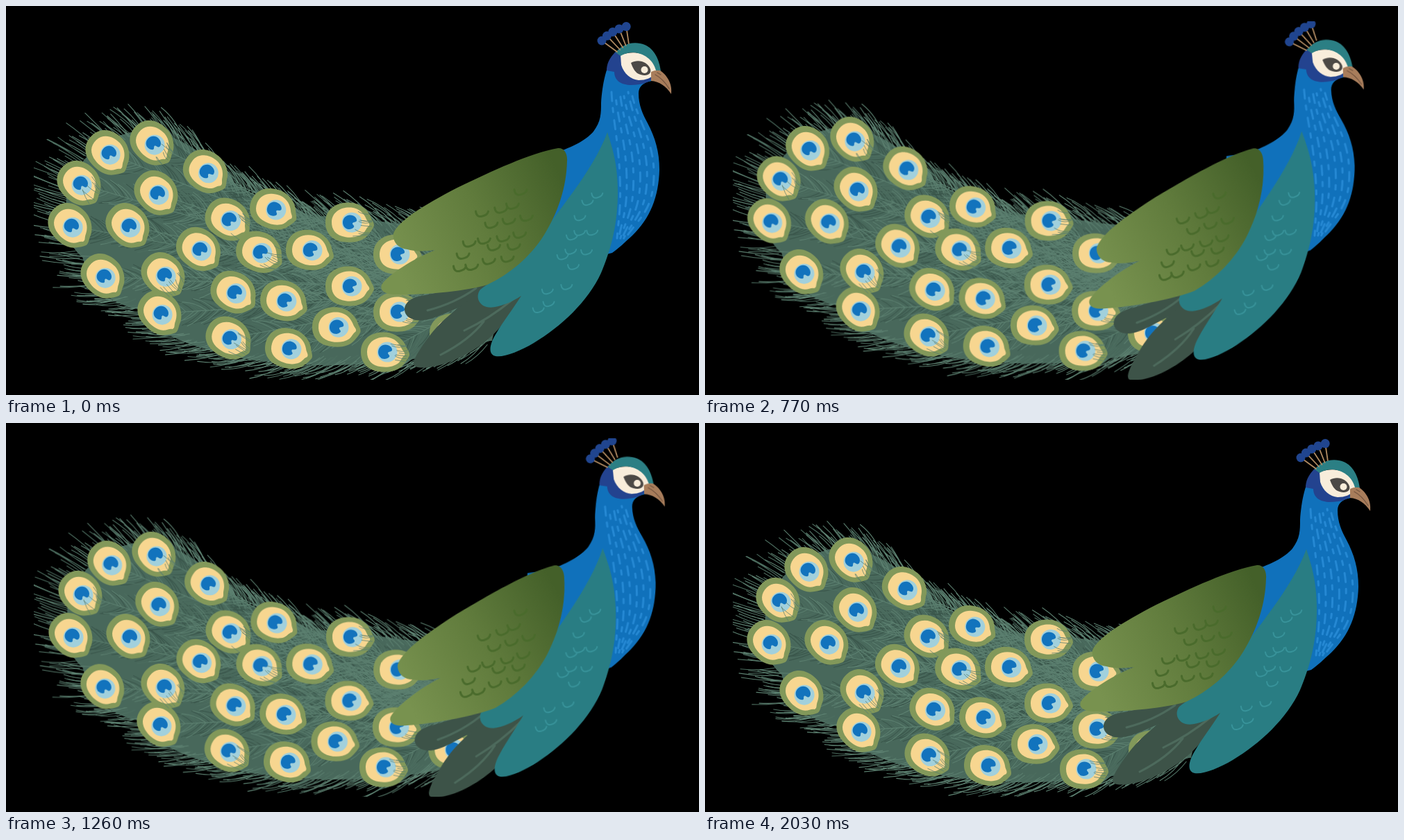
These frames come from a looping animation (998x561 px, 2.1 s). An HTML page:

```html
<!DOCTYPE html>
<html lang="en">
<head>
<meta charset="utf-8">
<title>Peacock</title>
<style>
html, body { margin: 0; width: 100%; height: 100%; overflow: hidden; background: #000; }
svg { display: block; width: 998px; height: 561px; }
.line { fill: none; stroke-linecap: round; stroke-linejoin: round; }
#tail { transform-origin: 710px 370px; }
#body { transform-origin: 769px 390px; }
#crest { transform-origin: 889px 88px; }
#plumes { transform-origin: 805px 290px; }
#teal { transform-origin: 830px 345px; }
#green { transform-origin: 797px 270px; }
</style>
</head>
<body>
<svg viewBox="0 0 998 561" xmlns="http://www.w3.org/2000/svg">
  <defs>
    <clipPath id="stage"><rect x="40" y="22" width="923" height="517"/></clipPath>
    <linearGradient id="moss" gradientUnits="userSpaceOnUse" x1="560" y1="370" x2="805" y2="260">
      <stop offset="0" stop-color="#78924f"/>
      <stop offset=".5" stop-color="#617c3d"/>
      <stop offset="1" stop-color="#446029"/>
    </linearGradient>
    <path id="rim" d="M640,318C560,320 500,298 440,304C385,270 340,282 305,232C270,200 215,168 170,185C125,195 100,235 90,260C82,300 82,340 110,362C122,405 150,430 190,437C220,483 300,498 340,508C430,522 560,528 700,482"/>
    <g id="eye">
      <path fill="#82985a" d="M-35,0C-35,-18 -20,-29 0,-28.500C14,-28 25,-19 29,-11C31,-5 36,-1 35,4C33,9 31,12 28,16C20,28 4,29.500 -8,28.500C-25,27 -35,16 -35,0Z"/>
      <path fill="#f7d690" d="M-26,0C-26,-14 -13,-22 1,-21.500C13,-21 20,-13 23,-7C25,-2 30,0 28,4C24,7 24,11 20,15C13,21 3,22.500 -5,21.500C-19,20 -26,12 -26,0Z"/>
      <circle cx="3" cy="0" r="14.500" fill="#a1d0dc"/>
      <path fill="#1273bd" d="M-10,0C-10,-6 -5,-10.500 0,-10.500C6,-10.500 10,-7 10,-3C9,0 5,-1 4,1C4,4 8,4 6,7C4,9 2,10 -1,10C-6,10 -10,6 -10,0Z"/>
    </g>
  </defs>
  <g clip-path="url(#stage)">
    <g id="tail"></g>
    <g id="body">
      <path fill="#1071bb" d="M757,216L785,213C812,206 835,194 846,181C857,166 857,155 857,140C859,112 864,85 878,66L935,88L930,108C918,110 911,116 911,126C911,143 917,156 924,169C935,190 941,210 941,236C940,275 928,306 902,331C892,340 882,350 873,356L800,375L750,300Z"/>
      <g id="dashes" class="line" stroke="#2588d3" stroke-width="3"></g>
      <path fill="#23438f" d="M879,65C868,75 865,85 865,93L876,95C876,108 887,114 900,114C915,114 927,110 931,104L900,92L887,69Z"/>
      <path fill="#f8eddb" d="M885,71C897,65 916,66 926,74C934,81 937,89 936,95C931,104 921,107 911,107C900,106 890,98 886,85Z"/>
      <path fill="#2b7f84" d="M878,67C888,54 905,50 920,56C934,62 941,78 943,94L936,93C932,77 918,68 904,67C896,67 890,69 885,72Z"/>
      <path fill="#4c4946" d="M900,82C910,76 924,80 928,91C930,98 923,102 914,99C906,97 903,90 900,82Z"/>
      <circle cx="919.500" cy="92" r="5" fill="#f8eddb"/>
      <path fill="#a87d5b" d="M929,95Q935,92 942,93C951,99 960,111 958,127C950,115 941,109 929,108Z"/>
      <path class="line" stroke="#765640" stroke-width="1.300" d="M935,99Q946,105 955,119M938,96l5,3"/>
      <g id="crest"></g>
    </g>
    <g id="plumes">
      <path fill="#3d5348" d="M574,438C574,426 587,419 604,417C640,409 690,398 720,395L690,426C665,428 650,436 635,442C617,450 603,455 590,453C580,451 574,445 574,438Z"/>
      <path fill="#3d5348" d="M660,429C642,443 625,455 609,477C595,496 584,513 588,519C596,525 626,520 647,510C677,497 699,479 716,458Q730,437 755,410L700,400Z"/>
      <path class="line" stroke="#4d6a5c" stroke-width="3" d="M607,439Q646,429 677,407M626,503Q667,482 688,455M660,468Q696,451 730,423"/>
    </g>
    <g id="teal">
      <path fill="#297d83" d="M866,182C874,207 882,232 881,275C880,320 870,354 857,385C838,426 800,462 760,486C738,499 712,509 702,504C693,499 699,483 706,472C716,455 730,437 742,418C725,429 705,437 692,434C680,431 676,418 683,409C705,392 740,370 765,340C790,300 845,240 866,182Z"/>
    </g>
    <g id="green">
      <path fill="url(#moss)" d="M795,205C803,204 809,212 808,224C807,262 795,298 775,330C755,362 725,387 693,402C660,412 600,417 560,416C545,416 538,410 541,402C550,388 585,365 618,352C602,354 587,354 578,351C565,350 556,340 558,328C565,310 600,288 650,262C700,238 755,212 795,205Z"/>
    </g>
  </g>
</svg>
<script>
const $ = id => document.getElementById(id);
let seed = 7;
const rnd = () => (seed = (seed * 16807) % 2147483647) / 2147483647;
const between = (a, b) => a + (b - a) * rnd();
const clamp = (v, a, b) => Math.min(b, Math.max(a, v));
const line = (d, color, width) =>
  `<path class="line" d="${d}" stroke="${color}" stroke-width="${width}"/>`;

// Key points: the centre of each eye, in rows from the top edge down.
const eyes = `212,198 289,239 386,293 495,312
  148,212 218,270 321,308 438,352 564,358
  107,256 177,317 279,351 366,355 495,404
  94,317 228,388 329,413 401,425 564,441
  141,390 223,443 322,479 408,494 476,463 546,499 645,472`
  .split(/\s+/).map(p => p.split(",").map(Number));
const root = [720, 400];
const shades = ["#3a564b", "#4c6d5f", "#5b7f6f"];
const hairs = shades.map(() => "");

// A strand that leaves at angle a and bends to angle b.
function strand(x, y, a, b, len) {
  const h = len / 2, cx = x + Math.cos(a) * h, cy = y + Math.sin(a) * h;
  const points = [x, y, cx, cy, cx + Math.cos(b) * h, cy + Math.sin(b) * h];
  const [p, q, r, s, t, u] = points.map(v => v.toFixed(1));
  return `M${p},${q}Q${r},${s} ${t},${u}`;
}

function growFringe() {
  const rim = $("rim"), total = rim.getTotalLength();
  for (let s = 0; s < total; s += 2.8) {
    const p = rim.getPointAtLength(s), q = rim.getPointAtLength(s + 1);
    const nx = p.y - q.y, ny = q.x - p.x;
    const flow = -.45 * clamp((620 - p.x) / 300, 0, 1);
    const lean = out => Math.atan2(flow + ny * out, nx * out - .95) + between(-.14, .14);
    const inset = between(-4, 14);
    hairs[1 + Math.floor(rnd() * 2)] +=
      strand(p.x - nx * inset, p.y - ny * inset, lean(.9), lean(.4), between(26, 60));
  }
}

// Barbs on both sides of the shaft that runs from an eye to the root.
function growFeather(x, y) {
  const cx = (x + root[0]) / 2, cy = y * .4 + root[1] * .6 + 12;
  const steps = Math.hypot(root[0] - x, root[1] - y) / 6;
  for (let k = 2; k < steps * .85; k++) {
    const t = k / steps, u = 1 - t;
    const px = u * u * x + 2 * u * t * cx + t * t * root[0];
    const py = u * u * y + 2 * u * t * cy + t * t * root[1];
    const a = Math.atan2(u * (y - cy) + t * (cy - root[1]), u * (x - cx) + t * (cx - root[0]));
    for (const side of [-1, 1])
      hairs[Math.floor(rnd() * 3)] +=
        strand(px, py, a + side * between(.6, .9), a + side * between(.1, .4), between(26, 44));
  }
  return `M${x},${y}Q${cx},${cy} ${root}`;
}

function buildTail() {
  growFringe();
  const shafts = eyes.map(([x, y]) => growFeather(x, y)).join("");
  let marks = "", over = "";
  eyes.forEach(([x, y], i) => {
    const tilt = clamp((510 - x) * .17, 2, 46), r = tilt * Math.PI / 180;
    marks += `<use href="#eye" transform="translate(${x},${y}) rotate(${tilt})"/>`;
    for (let k = 0; k < 8 && i % 3 === 0; k++) {
      const a = r + between(-.6, .6);
      over += strand(x + 32 * Math.cos(a), y + 32 * Math.sin(a),
        r + Math.PI + between(-.5, .2), r + Math.PI + between(-.1, .6), between(12, 24));
    }
  });
  $("tail").innerHTML =
    `<path fill="#48685b" d="${$("rim").getAttribute("d")}L${root}Z"/>` +
    hairs.map((d, i) => line(d, shades[i], 1.1)).join("") +
    line(shafts, shades[2], 1.2) + marks + line(over, shades[2], .8);
}

// Loose rows of crescents, slanting up the wing.
function scallops(id, x, y, cols, rows, [ax, ay], [ux, uy], r, color, width) {
  let d = "";
  for (let i = 0; i < rows; i++)
    for (let j = 0; j < cols; j++) {
      if (rnd() > .72) continue;
      const px = x + ax * j + ux * i + between(-4, 4) - r;
      const py = y + ay * j + uy * i + between(-4, 4);
      d += `M${px},${py}q1,${r} ${r},${r * .8}t${r},${-r * .8}`;
    }
  $(id).insertAdjacentHTML("beforeend", line(d, color, width));
}

function buildBody() {
  let dashes = "", stalks = "", tips = "";
  for (let k = 0; k < 6; k++) {
    const u = k / 5;
    dashes += `<path stroke-dasharray="13 10 6 12" stroke-dashoffset="${k * 17}" d="M${872 + 30 * u},${124 + k % 2 * 6}` +
      `C${874 + 36 * u},165 ${882 + 52 * u},195 ${884 + 49 * u},245S${882 + 30 * u},305 ${880 + 12 * u},335"/>`;
  }
  for (let i = 0; i < 5; i++) {
    const x = 858 + 7 * i + .45 * i * i, y = 50 - 7.5 * i + .6 * i * i;
    stalks += `M${x},${y}L${880 + 4.2 * i},${66 - 3 * i}`;
    tips += `<circle cx="${x}" cy="${y}" r="6.5" fill="#20458f"/>`;
  }
  $("dashes").innerHTML = dashes;
  $("crest").innerHTML = line(stalks, "#b18b62", 1.8) + tips;
}

buildTail();
buildBody();
scallops("green", 650, 376, 4, 6, [23, -4], [9, -20], 9, "#4a6b2c", 3);
scallops("teal", 765, 434, 3, 7, [16, -4], [12, -26], 8, "#38939a", 2);

// Motion: 30 held poses of 70 ms.
const count = 30, loop = 2100;
const sway = f => Math.abs(Math.sin(Math.PI * f / 29)) ** .85;
const lift = f => Math.exp(-(((f - 15) / 4) ** 2));

function swing(id, degrees, ease) {
  const poses = Array.from({ length: count + 1 }, (_, f) => ({
    offset: f / count,
    transform: `rotate(${(degrees * ease(f % count)).toFixed(3)}deg)`,
    easing: "steps(1, end)"
  }));
  $(id).animate(poses, { duration: loop, iterations: Infinity });
}

swing("tail", 1.65, lift);
swing("body", -2.12, sway);
swing("crest", -8, sway);
swing("plumes", -5.7, sway);
swing("teal", -2.5, sway);
swing("green", -5.4, sway);
</script>
</body>
</html>
```
